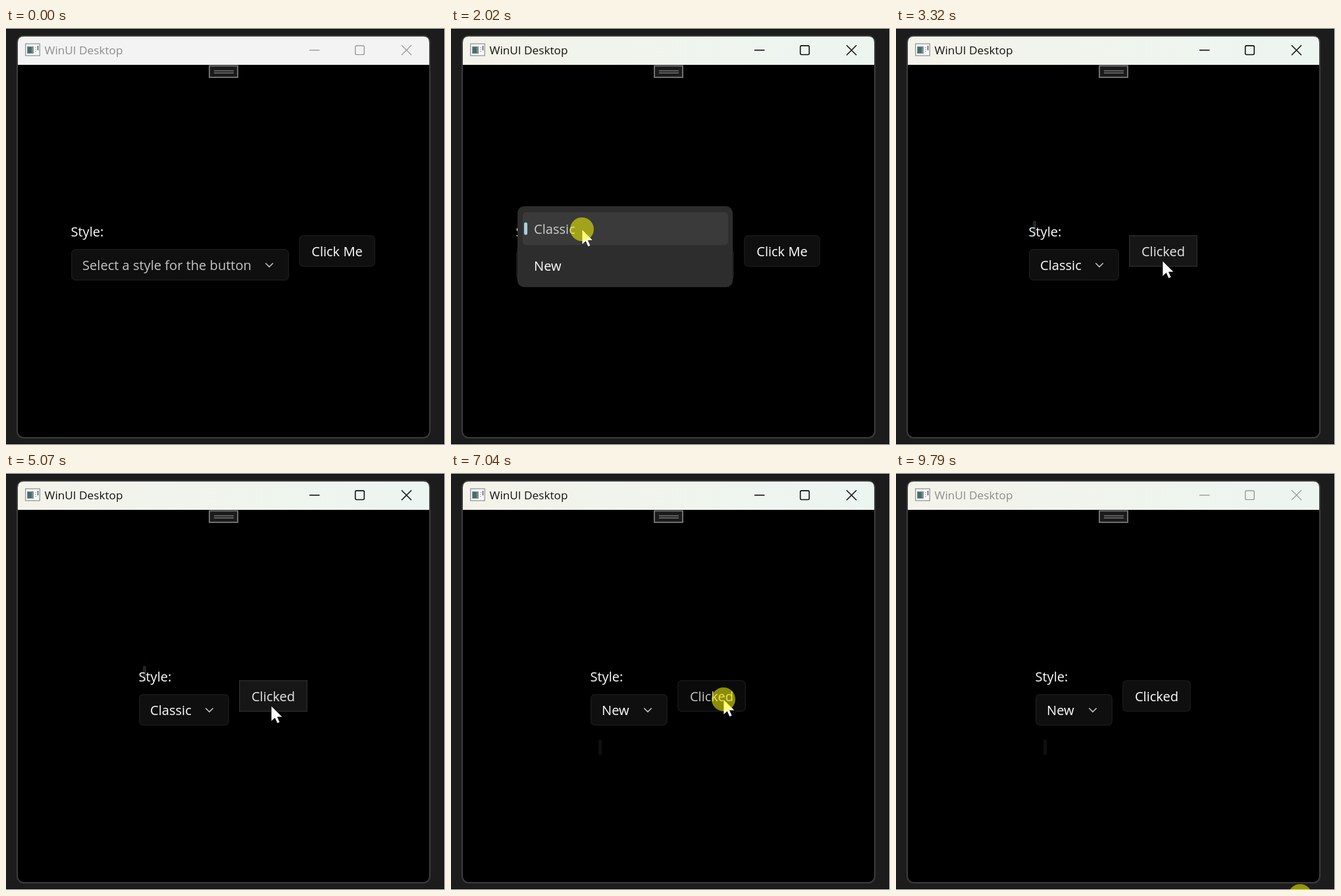
Write an HTML page that moves like this. It is 667 px wide and 634 px high and loops after 9.85 s.

```html
<!DOCTYPE html>
<html lang="en">
<head>
<meta charset="utf-8">
<title>Button style demo</title>
<style>
  html, body { margin: 0; width: 100%; height: 100%; overflow: hidden; background: #1c1c1c; }
  svg { display: block; width: 100vw; height: 100vh; }
  text { font: 20.1px "Open Sans", "Noto Sans", sans-serif; fill: #fff; white-space: pre; }
</style>
</head>
<body>
<svg viewBox="0 0 667 634" preserveAspectRatio="none">
  <defs>
    <linearGradient id="mica">
      <stop offset="0" stop-color="#f4f3ea"/>
      <stop offset=".3" stop-color="#f1f4ec"/>
      <stop offset="1" stop-color="#edf5f1"/>
    </linearGradient>
    <clipPath id="reveal"><rect id="revealBox" width="327"/></clipPath>
  </defs>

  <rect width="667" height="634" fill="#1c1c1c"/>
  <path d="M0 .5H666.5V633.5H0" fill="none" stroke="#d9d9d9"/>

  <rect x="17" y="12" width="627" height="611" rx="10" stroke="#3c3c3c" stroke-width="2"/>
  <path id="bar" d="M18 56V22q0-9 9-9H634q9 0 9 9V56z"/>
  <g id="icon">
    <rect x="29.7" y="24" width="21.6" height="18" fill="#fafafa" stroke="#8b8f92" stroke-width="1.2"/>
    <rect x="32" y="28" width="10" height="11" fill="#7f8c8d"/>
    <rect x="33" y="29" width="6" height="9" fill="#466e6c"/>
    <path d="M44 29.5h2M44 32.5h2M44 35.5h2" stroke="#aaa"/>
    <path d="M48.5 27v7" stroke="#555" stroke-width="1.5"/>
  </g>
  <text id="title" x="58.5" y="40" style="font-size:17.2px">WinUI Desktop</text>
  <g id="caption" fill="none" stroke-width="1.5">
    <path d="M461 33.7h15.5"/>
    <rect x="530.7" y="26.9" width="13.6" height="13.6" rx="2"/>
    <path d="M601 26.2l15 15m0-15l-15 15"/>
  </g>
  <rect x="309" y="57.5" width="43" height="17.5" fill="#1b1b1b" stroke="#707070" stroke-width="2"/>
  <path d="M316 65.2h30M316 68.4h30" stroke="#858585" stroke-width="1.2"/>

  <text id="label" y="317">Style:</text>
  <g id="combo">
    <rect id="comboBox" x=".75" y="336.75" height="46.5" rx="6" stroke="#1a1a1a" stroke-width="1.5"/>
    <text id="comboText" x="17" y="368"></text>
    <path id="chevron" d="M-5.7 357.5l5.7 5.6 5.7-5.6" fill="none" stroke="#c8c8c8" stroke-width="1.5"/>
  </g>
  <g id="button">
    <rect id="buttonBox" x=".75" y="315.75" height="46.5" stroke-width="1.5"/>
    <text id="buttonText" y="347" text-anchor="middle"></text>
  </g>

  <g id="popup">
    <g clip-path="url(#reveal)">
      <rect width="327" height="123" rx="10" fill="#2d2d2d"/>
      <rect id="row0" x="8" y="9" width="312" height="50" rx="5"/>
      <rect id="row1" x="8" y="65" width="312" height="50" rx="5"/>
      <rect id="pill" x="10" width="5" rx="2.5" fill="#a9ccd9"/>
      <text id="item0" x="25" y="42">Classic</text>
      <text id="item1" x="25" y="98">New</text>
    </g>
  </g>

  <g id="pointer">
    <path id="arrow" d="M0 0V23.5L5.5 18.6 9.2 26.6 13 25 9.5 17H17z" fill="#fff" stroke="#000" stroke-width=".7"/>
    <path id="resize" d="M0-17L7.5-8.5H2.2V8.5H7.5L0 17-7.5 8.5H-2.2V-8.5H-7.5z" fill="#fff" stroke="#000" stroke-width=".7"/>
    <circle id="glow" r="18" fill="#ff0" fill-opacity=".53"/>
  </g>
</svg>
<script>
const LOOP = 9850;
const CENTER = 330, GAP = 15;

// Pointer waypoints: time, x, y
const path = [
  [270, 606, 642], [870, 213, 356], [1620, 213, 356], [1780, 199, 306],
  [2230, 199, 306], [2700, 408, 357], [3180, 408, 357], [3320, 405, 354],
  [3560, 405, 354], [3730, 403, 354], [5070, 403, 354], [5380, 283, 360],
  [5760, 283, 360], [6040, 268, 418], [6250, 268, 418], [6570, 414, 344],
  [8330, 414, 344], [8580, 411, 345], [9040, 411, 345], [9480, 636, 560],
  [9700, 614, 643]
];

// Mouse button held: from, to
const presses = [
  [870, 1120], [2020, 2160], [3180, 3320], [3560, 3730], [3930, 4000],
  [4260, 4380], [4590, 4800], [5420, 5500], [6180, 6250], [6840, 7190],
  [7530, 7640], [7920, 7990], [8190, 8330], [8580, 8840], [9720, LOOP]
];

// Drop-down sessions: open, close, resting top, selected row
const menus = [
  { open: 1120, close: 2160, top: 271, selected: -1 },
  { open: 5500, close: 6250, top: 327, selected: 0 }
];
const OPEN_MS = 310, CLOSE_MS = 90;

const el = {};
document.querySelectorAll("[id]").forEach(n => el[n.id] = n);

const set = (node, attrs) => {
  for (const k in attrs) node.setAttribute(k, attrs[k]);
};
const show = (node, on) => set(node, { visibility: on ? "visible" : "hidden" });
const ink = (node, color) => { node.style.fill = color; };
const clamp = v => Math.min(1, Math.max(0, v));
const mix = (a, b, p) => a + (b - a) * p;
const smooth = p => p * p * (3 - 2 * p);
const easeOut = p => 1 - (1 - p) ** 3;
const between = (t, [a, b]) => t >= a && t < b;

function pointerAt(t) {
  const i = path.findIndex(k => k[0] > t);
  if (i < 0) return path[path.length - 1].slice(1);
  if (i === 0) return path[0].slice(1);
  const [t0, x0, y0] = path[i - 1], [t1, x1, y1] = path[i];
  const p = smooth((t - t0) / (t1 - t0));
  return [mix(x0, x1, p), mix(y0, y1, p)];
}

function drawWindow(t) {
  const active = t >= 870 && t < 9720;
  const color = active ? "#111" : "#8c8c8c";
  set(el.bar, { fill: t < 870 ? "#f3f3f3" : "url(#mica)" });
  ink(el.title, color);
  set(el.caption, { stroke: color, "stroke-width": active ? 1.6 : 1.2 });
}

function drawCombo(x, width, text, over, down) {
  const hint = text.startsWith("Select");
  set(el.label, { x: x - 0.5 });
  set(el.combo, { transform: `translate(${x} 0)` });
  set(el.comboBox, { width: width - 1.5, fill: down ? "#0b0b0b" : over ? "#151515" : "#0f0f0f" });
  set(el.chevron, { transform: `translate(${width - 30} 0)` });
  el.comboText.textContent = text;
  ink(el.comboText, hint || down ? "#c5c5c5" : "#fff");
}

function drawButton(x, width, text, classic, over, down) {
  set(el.button, { transform: `translate(${x} 0)` });
  set(el.buttonBox, {
    width: width - 1.5,
    rx: classic ? 0 : 6,
    fill: down ? "#0a0a0a" : over ? "#161616" : "#0f0f0f",
    stroke: classic ? "#292929" : "#181818"
  });
  set(el.buttonText, { x: width / 2 });
  el.buttonText.textContent = text;
  ink(el.buttonText, down ? "#c5c5c5" : over && classic ? "#e6e6e6" : "#fff");
}

function drawMenu(t, menu, x, py, down) {
  show(el.popup, menu);
  if (!menu) return;
  const { open, close, top, selected } = menu;
  const p = easeOut(clamp((t - open) / OPEN_MS));
  const y0 = mix(336, top, p), y1 = mix(384, top + 123, p);
  set(el.popup, {
    transform: `translate(${x + 2} ${top})`,
    opacity: 1 - clamp((t - close) / CLOSE_MS)
  });
  set(el.revealBox, { y: y0 - top, height: y1 - y0 });

  const hover = py < top + 62 ? 0 : 1;
  const held = down && t > open + OPEN_MS;
  const marked = held || t >= close ? hover : selected;
  for (const i of [0, 1]) {
    set(el["row" + i], { fill: i === hover ? "#3a3a3a" : i === marked ? "#363636" : "none" });
    ink(el["item" + i], held && i === hover ? "#cdcdcd" : "#fff");
  }
  const h = held ? 19 : 24;
  show(el.pill, marked >= 0);
  set(el.pill, { y: 34 + 56 * Math.max(0, marked) - h / 2, height: h });
}

function render(t) {
  const [px, py] = pointerAt(t);
  const down = presses.some(p => between(t, p));
  const menu = menus.find(m => between(t, [m.open, m.close + CLOSE_MS]));

  const classic = t >= 2160 && t < 6250;
  const clicked = t >= 3320;
  const picked = t < 2160 ? "Select a style for the button" : classic ? "Classic" : "New";
  const wide = t < 2160 || between(t, [5500, 6250]);
  const comboW = wide ? 331 : classic ? 137 : 117;
  const buttonW = clicked ? 104 : 116;
  const x = CENTER - (comboW + GAP + buttonW) / 2;
  const bx = x + comboW + GAP;

  const inside = (left, width, top) =>
    !menu && px >= left && px < left + width && py >= top && py < top + 48;
  const overCombo = inside(x, comboW, 336);
  const overButton = inside(bx, buttonW, 315);

  drawWindow(t);
  drawCombo(x, comboW, picked, overCombo, overCombo && down);
  drawButton(bx, buttonW, clicked ? "Clicked" : "Click Me", classic, overButton, overButton && down);
  drawMenu(t, menu, x, py, down);

  const resizing = between(t, [5560, 5790]);
  set(el.pointer, { transform: `translate(${px} ${py})` });
  show(el.pointer, t >= 270);
  set(el.arrow, { display: resizing ? "none" : "inline" });
  set(el.resize, { display: resizing ? "inline" : "none" });
  set(el.glow, { display: down ? "inline" : "none" });
}

const start = performance.now();
function tick() {
  render((performance.now() - start) % LOOP);
  requestAnimationFrame(tick);
}
tick();
</script>
</body>
</html>
```
